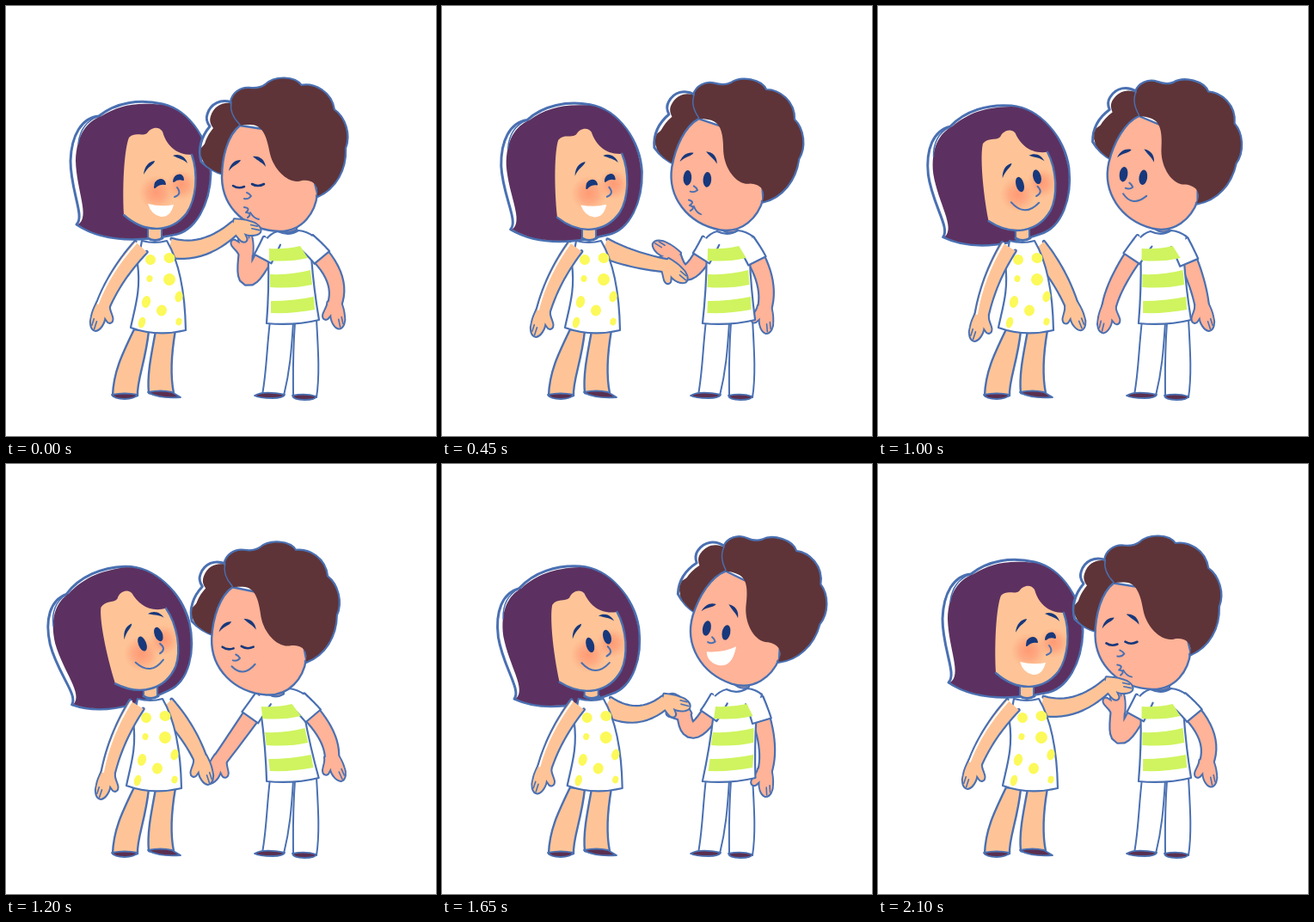
Write an HTML page with a canvas that moves like this. It is 500x500 px and loops after 2.15 s.

```html
<!DOCTYPE html>
<html lang="en">
<head>
<meta charset="utf-8">
<title>Hand kiss</title>
<style>
html, body { margin: 0; height: 100%; overflow: hidden; background: #fff; }
canvas { display: block; width: 100vw; height: 100vh; }
</style>
</head>
<body>
<canvas id="stage" width="500" height="500"></canvas>
<script>
const ctx = document.getElementById('stage').getContext('2d');
const LOOP = 2150, STEP = 50, DEG = Math.PI / 180;
const BLUE = '#4a70b2', NAVY = '#17387c', WHITE = '#fff', SHOE = '#5a2f50';
const GIRL_SKIN = '#fec497', GIRL_HAIR = '#5c3161';
const BOY_SKIN = '#ffb398', BOY_HAIR = '#5e3439';
const YELLOW = '#fcf95a', LIME = '#cff45f';

// Tracks: time first, then the animated values.
// Head: neck x, neck y, tilt (girl: also body shift)
const girlHead = [
  [0, 172, 263, 0, 0], [450, 170, 264, -3, -2], [600, 166, 264, -7, -4],
  [1000, 166, 265, -8, -5], [1200, 166, 266, -14.5, -5], [1280, 167, 267, -15.5, -4],
  [1500, 172, 268, -12, -1], [1850, 176, 267, -5, 2], [2100, 172, 263, 0, 0]];
const boyHead = [
  [0, 328, 258, 0], [450, 333, 258, 10], [670, 358, 253, 22], [1000, 329, 257, 14],
  [1200, 313, 265, 3], [1500, 331, 262, 9], [1740, 353, 252, 20.5],
  [1850, 352, 252, 20], [2100, 329, 258, 0.5]];
// Arms: elbow control x y, wrist x y, hand angle
const girlInner = [
  [0, 230, 291, 268, 256, 12], [450, 220, 296, 262, 302, 40], [1000, 212, 312, 226, 350, 68],
  [1200, 213, 310, 227, 345, 72], [1500, 223, 310, 252, 300, 20],
  [1850, 232, 292, 267, 255, 12], [2100, 230, 291, 268, 256, 12]];
const boyInner = [
  [0, 272, 352, 279, 286, -95], [450, 282, 336, 270, 291, -148], [1000, 274, 320, 268, 352, -256],
  [1200, 272, 312, 248, 345, -245], [1500, 283, 332, 270, 311, -160],
  [1850, 290, 340, 291, 274, -100], [2100, 272, 352, 279, 286, -95]];
const boyOuter = [
  [0, 394, 313, 382, 347, 78], [450, 384, 318, 375, 352, 85], [1000, 372, 316, 377, 350, 72],
  [1200, 380, 312, 379, 342, 66], [1500, 385, 320, 375, 355, 85],
  [1850, 384, 330, 376, 360, 88], [2100, 394, 313, 382, 347, 78]];
// Girl's outer wrist
const girlOuter = [
  [0, 112, 350], [450, 117, 357], [1000, 120, 362], [1200, 118, 362],
  [1500, 120, 360], [1850, 115, 350], [2100, 112, 350]];

// Monotone cubic interpolation around the loop
function at(track, t) {
  const n = track.length;
  const row = j => track[(j + n) % n];
  const time = j => row(j)[0] + LOOP * Math.floor(j / n);
  let i = n - 1;
  while (track[i][0] > t) i--;
  const slope = (j, k) => (row(j + 1)[k] - row(j)[k]) / (time(j + 1) - time(j));
  const tangent = (j, k) => {
    const a = slope(j - 1, k), b = slope(j, k);
    return a * b <= 0 ? 0 : 2 * a * b / (a + b);
  };
  const span = time(i + 1) - time(i), u = (t - time(i)) / span;
  return row(i).slice(1).map((p, c) => {
    const k = c + 1, q = row(i + 1)[k];
    return p + (q - p) * u * u * (3 - 2 * u)
      + span * u * (1 - u) * (tangent(i, k) * (1 - u) - tangent(i + 1, k) * u);
  });
}

function shape(path, fill, line, width = 2.4) {
  const p = typeof path === 'string' ? new Path2D(path) : path;
  if (fill) { ctx.fillStyle = fill; ctx.fill(p); }
  if (line) { ctx.strokeStyle = line; ctx.lineWidth = width; ctx.stroke(p); }
}

function oval(x, y, rx, ry, fill, tilt = 0) {
  const p = new Path2D();
  p.ellipse(x, y, rx, ry, tilt * DEG, 0, 7);
  shape(p, fill);
}

function group(draw, x = 0, y = 0, tilt = 0, px = 0, py = 0) {
  ctx.save();
  ctx.translate(x, y);
  ctx.rotate(tilt * DEG);
  ctx.translate(-px, -py);
  draw();
  ctx.restore();
}

// Tapered tube along a quadratic curve
function limb(s, c, w, from, to, end = 1) {
  const left = [], right = [];
  for (let i = 0; i <= 14; i++) {
    const u = i / 14 * end, v = 1 - u;
    const x = v * v * s[0] + 2 * u * v * c[0] + u * u * w[0];
    const y = v * v * s[1] + 2 * u * v * c[1] + u * u * w[1];
    const dx = v * (c[0] - s[0]) + u * (w[0] - c[0]);
    const dy = v * (c[1] - s[1]) + u * (w[1] - c[1]);
    const r = (from + (to - from) * u) / 2 / Math.hypot(dx, dy);
    left.push([x - dy * r, y + dx * r]);
    right.unshift([x + dy * r, y - dx * r]);
  }
  return new Path2D('M' + left.concat(right).join('L'));
}

const HAND = 'M-4-7C1-8 4-12 9-15C14-17 16-13 13-10L10-6C18-8 26-5 28-1C29 4 22 8 15 8C8 9 2 8-4 7Z';

function arm(s, c, w, angle, skin, thumb, from, to) {
  const tube = limb(s, c, w, from, to);
  const hand = (fill, line) => group(() => {
    ctx.scale(1, thumb);
    shape(HAND, fill, line, 4);
  }, w[0], w[1], angle);
  shape(tube, null, BLUE, 4.4);
  hand(null, BLUE);
  shape(tube, skin);
  hand(skin);
  group(() => {
    ctx.scale(1, thumb);
    shape('M27 1L18 1M24 5L16 5', null, BLUE, 1.6);
  }, w[0], w[1], angle);
}

function sleeve(s, c, w) {
  const reach = 27 / (2 * Math.hypot(c[0] - s[0], c[1] - s[1]));
  shape(limb(s, c, w, 22, 25, reach), WHITE, BLUE, 2.2);
}

function blush(x, y, r) {
  const g = ctx.createRadialGradient(x, y, 0, x, y, r);
  g.addColorStop(0, 'rgba(255,140,105,.75)');
  g.addColorStop(0.5, 'rgba(255,145,110,.5)');
  g.addColorStop(1, 'rgba(255,160,120,0)');
  oval(x, y, r, r, g);
}

function girlHairBack() {
  shape('M82 254C92 245 75 215 75 180C76 150 88 130 108 128C128 112 155 108 182 114C215 122 238 160 238 195C237 230 220 262 195 266C160 273 115 276 82 254Z', WHITE, BLUE, 3);
  shape('M84 254C98 245 82 215 81 180C82 150 94 134 111 128C130 116 150 111 182 115C215 122 237 160 237 195C236 230 220 261 195 265C160 272 115 275 84 254Z', GIRL_HAIR);
  shape('M84 160C86 143 94 133 108 128', null, BLUE, 1.5);
}

function girlFace(laughing) {
  const edge = 'C162 265 192 264 210 241C221 225 224 195 216 173';
  shape('M137 243' + edge + 'C196 173 186 160 182 146C178 139 168 141 164 148C158 152 150 146 143 153C138 165 135 205 137 243Z', GIRL_SKIN);
  shape('M137 243' + edge, null, BLUE);
  blush(175, 217, 21);
  blush(204, 208, 18);
  shape('M160 196C161 186 166 181 173 180C172 185 165 186 160 196ZM194 174C202 171 209 176 211 183C206 178 202 178 194 174Z', NAVY);
  shape('M199 211Q205 219 196 222', null, BLUE, 2);
  if (laughing) {
    shape('M173 211C173 201 184 199 185 207Q178 206 173 211ZM195 204C196 195 206 194 206 202Q200 200 195 204Z', NAVY, NAVY, 2);
    shape('M165 230Q181 234 195 231Q191 246 180 245Q169 243 165 230Z', WHITE);
  } else {
    oval(179, 206, 4.6, 9, NAVY, -7);
    oval(200, 200, 4.6, 8.6, NAVY, -7);
    shape('M166 225Q179 245 198 230', null, BLUE, 2);
  }
}

function girlLegs() {
  shape('M149 376C135 405 125 425 124 453Q138 458 153 453C152 435 162 415 166 378Z', GIRL_SKIN, BLUE);
  shape('M174 378C168 410 164 430 166 450Q180 455 195 450C190 425 193 400 197 377Z', GIRL_SKIN, BLUE);
  shape('M123 452Q138 449 153 452Q149 457 138 457Q126 457 123 452ZM165 449Q180 446 193 449L203 455Q178 457 165 449Z', SHOE, BLUE, 1.8);
}

function girlDress() {
  shape('M165 252V270Q173 275 181 270V252Z', GIRL_SKIN, BLUE, 2);
  shape('M158 273Q173 277 187 273C197 290 208 320 209 377Q175 385 145 374C150 350 157 330 153 300Z', WHITE, BLUE, 2.2);
  shape('M165 270Q173 275 182 270', null, BLUE, 3);
  [[168, 295, 6, 6], [190, 293, 6.5, 6], [167, 317, 3.5, 4], [190, 318, 7, 7], [163, 344, 5, 7],
   [181, 354, 6, 6.5], [201, 338, 4.5, 6.5], [158, 368, 4, 6.5], [201, 367, 3.5, 4.5]]
    .forEach(([x, y, rx, ry]) => oval(x, y, rx, ry, YELLOW, 15));
}

function boyLegs() {
  shape('M307 366C303 400 303 425 298 452L323 453C330 425 332 400 334 368Z', WHITE, BLUE, 2);
  shape('M336 368C333 410 334 430 334 454L361 455C365 430 363 400 361 364Z', WHITE, BLUE, 2);
  shape('M289 453Q300 447 324 452Q322 456 310 456Q294 456 289 453ZM333 453Q348 450 361 454Q360 458 347 458Q334 458 333 453Z', SHOE, BLUE, 1.8);
}

function sheared(lean, draw) {
  ctx.save();
  ctx.transform(1, 0, -lean / 105, 1, lean * 368 / 105, 0);
  draw();
  ctx.restore();
}

const shirt = () => shape('M316 262Q329 268 340 261Q350 262 358 268L355 292Q358 330 364 365Q335 372 303 369Q306 330 305 292L302 272Q308 264 316 262Z', WHITE, BLUE, 2.2);
const stripes = () => shape('M306 282Q325 283 342 279L351 293Q330 298 306 296ZM307 312Q332 313 354 307L356 324Q334 329 307 327ZM308 343Q334 343 358 338L359 353Q334 358 308 357Z', LIME);

function boyHairBack() {
  const tuft = new Path2D('M262 112C250 108 238 113 234 126C232 132 234 136 237 140C227 152 223 166 227 181C236 190 246 194 254 196L275 140Z');
  shape(tuft, WHITE, BLUE, 3);
  ctx.save();
  ctx.clip(tuft);
  ctx.translate(4, 2);
  shape(tuft, BOY_HAIR);
  ctx.restore();
  shape('M227 165Q224 178 235 187L255 196L262 160L240 150Z', BOY_HAIR);
}

function boyFace(eyesOpen, mouth) {
  shape('M320 248V261Q329 266 338 260V248Z', BOY_SKIN, BLUE, 2.2);
  shape('M272 139C258 150 251 175 251 200C252 235 280 261 318 262C345 262 360 240 362 218L345 150Z', BOY_SKIN, BLUE);
  const crown = 'M262 112C263 103 272 95 283 96C293 97 298 95 302 92C312 82 336 82 343 93C358 90 378 100 381 121C394 130 400 150 394 165C395 190 383 212 362 221';
  shape(crown, null, BLUE, 4.4);
  shape(crown + 'C364 206 355 202 344 203C330 208 312 192 307 172C303 150 298 138 284 138Q276 138 272 139C264 128 259 122 262 112Z', BOY_HAIR);
  shape('M262 112C260 122 264 130 272 138', null, BLUE, 1.4);
  shape('M259 192C261 183 266 179 273 179C271 184 265 184 259 192ZM287 175C295 174 301 179 302 187C298 182 294 181 287 175Z', NAVY);
  shape('M280 217Q283 218 285 221Q282 225 277 224', null, BLUE, 2);
  if (eyesOpen) {
    oval(271, 209, 4.8, 8.8, NAVY, -6);
    oval(294, 207, 4.8, 8.8, NAVY, -6);
  } else {
    shape('M264 209Q270 213 277 210M286 207Q293 211 300 207', null, NAVY, 2.6);
  }
  if (mouth === 'kiss') {
    shape('M277 234Q285 235 279 240Q287 241 281 246', null, BLUE, 2);
    shape('M284 240Q288 247 294 248', null, BLUE, 1.8);
  } else if (mouth === 'smile') {
    shape('M276 231Q290 244 303 227', null, BLUE, 2);
  } else if (mouth === 'grin') {
    shape('M279 235Q297 231 310 219Q313 245 296 246Q283 246 279 235Z', WHITE);
  } else {
    shape('M285 228Q293 231 300 228Q302 242 292 242Q283 240 285 228Z', WHITE);
  }
}

function boyMouth(t) {
  if (t < 550 || t >= 1950) return 'kiss';
  return t < 1350 ? 'smile' : t < 1750 ? 'grin' : 'talk';
}

function scene(t) {
  const [gx, gy, gTilt, shift] = at(girlHead, t);
  const [bx, by, bTilt] = at(boyHead, t);
  const lean = (bx - 328) * 0.75;
  const pose = track => {
    const [cx, cy, wx, wy, angle] = at(track, t);
    return [[cx, cy], [wx, wy], angle];
  };
  const [bic, biw, bia] = pose(boyInner);
  const [boc, bow, boa] = pose(boyOuter);
  const [gic, giw, gia] = pose(girlInner);
  const bis = [309 + lean * 0.9, 273], bos = [350 + lean * 0.9, 275];

  ctx.fillStyle = WHITE;
  ctx.fillRect(0, 0, 500, 500);
  ctx.lineCap = ctx.lineJoin = 'round';

  group(girlHairBack, gx, gy, gTilt, 172, 263);
  girlLegs();

  group(boyHairBack, bx, by, bTilt, 328, 258);
  boyLegs();
  arm(bis, bic, biw, bia, BOY_SKIN, 1, 19, 14);
  arm(bos, boc, bow, boa, BOY_SKIN, -1, 20, 14);
  sheared(lean, shirt);
  sleeve(bis, bic, biw);
  sleeve(bos, boc, bow);
  sheared(lean, stripes);
  group(() => boyFace(t >= 200 && t < 1100 || t >= 1300 && t < 1950, boyMouth(t)), bx, by, bTilt, 328, 258);

  arm([190 + shift, 281], gic, giw, gia, GIRL_SKIN, -1, 21, 13);
  group(girlDress, shift);
  const wrist = at(girlOuter, t), shoulder = [157 + shift, 280];
  const elbow = [(shoulder[0] + wrist[0]) / 2 - 8, (shoulder[1] + wrist[1]) / 2 - 2];
  arm(shoulder, elbow, wrist, 108, GIRL_SKIN, 1, 18, 14);
  shape(`M${shoulder[0] - 6} ${shoulder[1] - 4}Q${elbow[0] - 6} ${elbow[1] - 3} ${wrist[0] - 5} ${wrist[1] - 4}`, null, WHITE, 2);
  group(() => girlFace(t < 600 || t >= 1950), gx, gy, gTilt, 172, 263);
}

function tick(now) {
  scene(Math.floor(now % LOOP / STEP) * STEP);
  requestAnimationFrame(tick);
}
requestAnimationFrame(tick);
</script>
</body>
</html>
```
